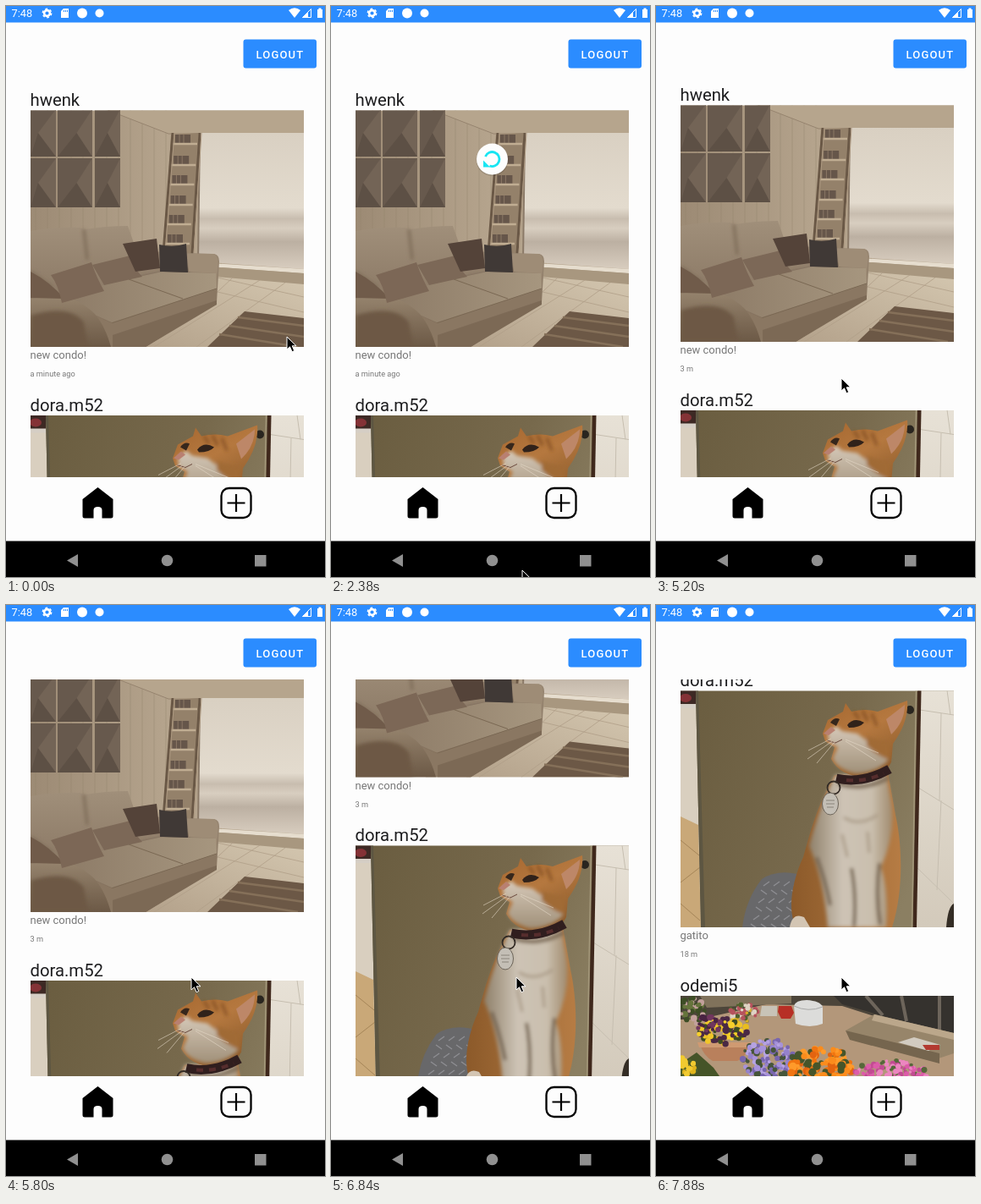
Animation, 377 px wide and 675 px high, one loop 8000 ms. Source, as an HTML page:

```html
<!DOCTYPE html>
<html lang="en">
<head>
<meta charset="utf-8">
<title>Photo feed</title>
<style>
html, body { margin: 0; width: 100%; height: 100%; overflow: hidden; background: #fdfdfd; }
svg { display: block; font-family: Roboto, sans-serif; }
.name { font-size: 20.3px; fill: #1d1d1f; }
.caption { font-size: 13px; fill: #777; }
.age { font-size: 9.2px; fill: #777; }
</style>
</head>
<body>
<svg width="377" height="675" viewBox="0 0 377 675">
<defs>
  <linearGradient id="wall"><stop stop-color="#9c8a74"/><stop offset=".5" stop-color="#b5a48d"/><stop offset="1" stop-color="#b3a38c"/></linearGradient>
  <linearGradient id="window" x2="0" y2="1">
    <stop stop-color="#d9d0c2"/><stop offset=".55" stop-color="#e3dbce"/><stop offset=".63" stop-color="#c8bdaf"/>
    <stop offset=".7" stop-color="#d8cec0"/><stop offset=".8" stop-color="#bcb0a2"/><stop offset="1" stop-color="#d8cdbf"/>
  </linearGradient>
  <linearGradient id="sofa" x2="0" y2="1"><stop stop-color="#a08f7a"/><stop offset="1" stop-color="#7d6a57"/></linearGradient>
  <linearGradient id="seat" x2="1"><stop stop-color="#8b7965"/><stop offset="1" stop-color="#a6967f"/></linearGradient>
  <linearGradient id="arm" x2="0" y2="1"><stop stop-color="#95836d"/><stop offset="1" stop-color="#6c5946"/></linearGradient>
  <linearGradient id="floor" x1="1" x2="0" y2="1"><stop stop-color="#d4c7b0"/><stop offset="1" stop-color="#b3a18a"/></linearGradient>
  <linearGradient id="door" x2="1" y2=".3"><stop stop-color="#695c3f"/><stop offset=".6" stop-color="#77694c"/><stop offset="1" stop-color="#8b7f62"/></linearGradient>
  <linearGradient id="fur" x2="1"><stop stop-color="#8c5a2a"/><stop offset="1" stop-color="#b67c44"/></linearGradient>
  <linearGradient id="chest" x2="1"><stop stop-color="#8f806a"/><stop offset=".4" stop-color="#cdc3b5"/><stop offset=".75" stop-color="#cabfae"/><stop offset="1" stop-color="#a08a6d"/></linearGradient>
  <linearGradient id="head" x2=".6" y2="1"><stop stop-color="#a5672f"/><stop offset=".5" stop-color="#b5783f"/><stop offset="1" stop-color="#8d5c2d"/></linearGradient>
  <linearGradient id="muzzle" x2="0" y2="1"><stop stop-color="#d6c9b9"/><stop offset="1" stop-color="#a09079"/></linearGradient>
  <linearGradient id="tiles" x2="0" y2="1"><stop stop-color="#e7e1d6"/><stop offset="1" stop-color="#d3cabb"/></linearGradient>
  <filter id="soft"><feGaussianBlur stdDeviation="2"/></filter>
</defs>
<rect width="377" height="675" fill="#fdfdfd"/>

<svg y="88" width="377" height="469" viewBox="0 88 377 469">
<g id="feed">
  <text class="name" x="28.5" y="118">hwenk</text>
  <svg x="29" y="123.5" width="323" height="279.5" viewBox="29 123.5 323 279.5">
    <rect x="29" y="123" width="323" height="280" fill="url(#wall)"/>
    <path id="planks" stroke="#94826c" stroke-width=".7" opacity=".6"/>
    <path d="M120 123H352V151H192z" fill="#b6a58d"/>
    <path d="M120 123L192 151H352" fill="none" stroke="#96846f"/>
    <path d="M229 150H352V311L227 302z" fill="url(#window)"/>
    <path d="M229 150L227 302" stroke="#8b7a68" stroke-width="2"/>
    <path d="M225 303L352 311V316L225 307z" fill="#e6ddce"/>
    <path d="M225 307L352 316V330L225 320z" fill="#a8977f"/>
    <path d="M225 318L352 329V403H160z" fill="url(#floor)"/>
    <path d="M245 320L352 344M250 338L352 362M330 327L225 403M300 324L175 403M268 321L235 352" stroke="#b09f88" stroke-width=".8"/>
    <path d="M282 361L352 369V403H238z" fill="#6c5846"/>
    <path d="M274 368L352 378M264 378L352 391M252 388L345 403" stroke="#857059" stroke-width="2.500"/>
    <g id="panels"></g>
    <path d="M195 152L228 150 221 293H187z" fill="#94816a"/>
    <g id="shelves"></g>
    <path d="M197 150L186 292M229 150L220 293" stroke="#6a5846" stroke-width="3"/>
    <path d="M199 150L188 292M231 150L222 293" stroke="#ac9880"/>
    <path d="M29 266Q60 261 87 262L94 264Q118 260 144 260L151 280L182 291L246 293Q252 294 252 302L249 350L165 403H29z" fill="url(#sofa)"/>
    <g filter="url(#soft)" fill="none">
      <path d="M92 264L96 300M29 314L55 333" stroke="#7c6a57" stroke-width="3"/>
      <path d="M52 352L116 340 163 322 216 312" stroke="#69574a" stroke-width="5"/>
    </g>
    <path d="M55 350L124 327L185 314L249 316V334L125 374L98 362z" fill="url(#seat)"/>
    <path d="M59 350L125 375L249 334M145 323L209 346M213 296V314" stroke="#7a6853" fill="none"/>
    <path d="M100 364L126 375L249 335V349L165 403H112z" fill="#8a7762"/>
    <path d="M126 389L249 348V353L165 403H126z" fill="#7c6955"/>
    <path d="M29 346Q75 339 94 355Q114 367 124 403H29z" fill="url(#arm)"/>
    <path d="M29 366Q75 352 92 374L97 403H29z" fill="#6d5945" filter="url(#soft)"/>
    <path d="M214 293H246Q252 296 250 310L248 335V316L216 314z" fill="#9e8c76"/>
    <path d="M29 314Q52 326 69 346L29 345z" fill="#705b4a"/>
    <path d="M53 318L101 303Q107 321 116 337L66 351Q62 330 53 318z" fill="#7c6756"/>
    <path d="M102 306L147 295Q151 310 161 320L116 330z" fill="#7c6857"/>
    <path d="M138 281L178 275 182 310 153 314z" fill="#544339"/>
    <path d="M181 282Q198 286 213 281L215 315 182 314z" fill="#403936"/>
  </svg>
  <text class="caption" x="28.5" y="417">new condo!</text>
  <text class="age" id="age" x="28.5" y="438.300"></text>

  <text class="name" x="28.5" y="478.5">dora.m52</text>
  <svg x="29" y="484" width="323" height="279.5" viewBox="29 188.5 323 279.5">
    <rect x="29" y="188" width="323" height="280" fill="url(#door)"/>
    <path d="M29 188H47L53 468H29z" fill="#d9cfbf"/>
    <path d="M29 188H47V208H29z" fill="#3d2924"/>
    <path d="M29 204H47V209H29z" fill="#d5cec5"/>
    <ellipse cx="35" cy="197" rx="7" ry="5" fill="#843236"/>
    <path d="M29 337L50 347 53 468H29z" fill="#c9a878"/>
    <path d="M29 365L51 383M29 415L52 397M29 440L52 460" stroke="#a58558"/>
    <path d="M47 188L53 468H58L50 188z" fill="#5d5642"/>
    <path d="M313 188H352V468H305z" fill="url(#tiles)"/>
    <path d="M312 211L352 217M310 303L352 329M308 397L352 440M344 188L348 217M337 215L335 318M337 318L332 424" stroke="#c6beb0" fill="none"/>
    <path d="M309 188H313.500L308 468H303.500z" fill="#3f281c"/>
    <path d="M307.500 188L302.500 468" stroke="#a3977a" stroke-width="1.500"/>
    <path d="M343 468Q345 443 352 440V468z" fill="#342d25"/>
    <circle cx="300" cy="211" r="5" fill="#29251f"/>
    <path d="M102 468Q106 435 125 411Q145 398 174 407L195 468z" fill="#68686a"/>
    <path id="tread" stroke="#8d8d91" stroke-width="1.500" fill="none"/>
    <path d="M211 288C188 330 183 354 174 385C160 415 155 450 166 468H279C293 425 291 370 283 335L274 285z" fill="url(#fur)"/>
    <g filter="url(#soft)">
      <path d="M212 288C199 313 188 345 181 372Q198 410 203 468H272Q275 425 266 397Q284 355 278 320L272 287z" fill="url(#chest)"/>
      <path d="M190 385Q200 411 206 442M231 398Q237 430 234 467M264 392Q259 430 265 465" stroke="#75644f" stroke-width="4" fill="none"/>
      <path d="M215 298Q245 308 275 291" stroke="#7d6b55" stroke-width="5" fill="none"/>
      <path d="M222 338Q240 350 262 335M220 358L226 385M250 355L252 380" stroke="#a99a86" stroke-width="3" fill="none"/>
    </g>
    <path d="M158 468Q161 450 175 456L182 468z" fill="#d3c5b3"/>
    <path d="M197 239L203 223L221 213 224 203L231 213Q248 209 262 213L297 200Q299 225 280 251L278 273Q270 289 247 290Q218 290 207 269L211 255 200 248z" fill="url(#head)"/>
    <path d="M272 222L294 205Q294 225 278 240z" fill="#bd8768"/>
    <g filter="url(#soft)">
      <path d="M203 238L213 230L220 236 238 239Q251 250 268 259L274 271Q260 285 236 286Q214 281 209 268L215 255 204 249z" fill="url(#muzzle)"/>
      <path d="M249 242Q263 248 277 248L276 270Q262 266 249 253z" fill="#a06b36"/>
      <path d="M234 213L240 222M244 212L250 224M255 215L261 230" stroke="#845024" stroke-width="3"/>
    </g>
    <path d="M226 229Q234 219 246 226Q241 232 228 232z" fill="#30221a"/>
    <path d="M206 226Q211 219 217 222L213 230z" fill="#36271c"/>
    <path d="M198 239L207 231 212 235 204 241z" fill="#b98071"/>
    <path d="M202 247L212 250 220 246" stroke="#6b493d" fill="none"/>
    <path d="M207 245L180 259M208 248L179 269M211 249L190 274M224 248L260 271M224 246L263 262" stroke="#e4d9c8" stroke-width=".6"/>
    <path d="M213 292Q244 299 276 281" fill="none" stroke="#301e1e" stroke-width="11"/>
    <path d="M225 294Q248 296 269 286" fill="none" stroke="#562d2d" stroke-width="4" stroke-dasharray="8 7"/>
    <circle cx="210" cy="303" r="7.500" fill="none" stroke="#332b25" stroke-width="1.800"/>
    <ellipse cx="206" cy="322" rx="9.500" ry="13" fill="#c4bfb6" stroke="#6c6459"/>
    <path d="M201 318h10M201 322h10M202 326h8" stroke="#8a847a"/>
  </svg>
  <text class="caption" x="28.5" y="777.500">gatito</text>
  <text class="age" x="28.5" y="798.800">18 m</text>

  <text class="name" x="28.5" y="839">odemi5</text>
  <svg id="garden" x="29" y="844.5" width="323" height="279.5" viewBox="29 462 323 279.5">
    <rect x="29" y="462" width="323" height="280" fill="#b3977a"/>
    <path d="M29 462H352V516L220 474 130 472 50 490H29z" fill="#4c453a"/>
    <path d="M210 462H352V510L220 472z" fill="#35322e"/>
    <path d="M248 462L268 485M290 462L296 492M335 462V504" stroke="#6d655b" stroke-width="4"/>
    <path d="M52 462H160V471L60 476z" fill="#80725b"/>
    <path d="M224 503L258 484 352 506V530L334 536z" fill="#97856a"/>
    <path d="M224 503L335 530V542L229 514z" fill="#75654e"/>
    <path d="M258 484L352 506V514L255 491z" fill="#bba78b"/>
    <path d="M286 517L305 511 336 520 322 527z" fill="#d2cbc0"/>
    <path d="M315 520h20v6h-16z" fill="#b33a31"/>
    <path d="M163 474Q165 467 178 467Q194 468 197 475V495Q182 501 165 495z" fill="#dcdcda"/>
    <path d="M163 474Q180 482 197 475" fill="none" stroke="#a8a9a8"/>
    <path d="M125 474h18v12h-20z" fill="#c8c3b7"/>
    <path d="M145 474h15l3 8-4 7h-11l-4-8z" fill="#b72f25"/>
    <path d="M52 519H109Q107 535 96 539H67Q56 533 52 519z" fill="#b9805c"/>
    <path d="M49 517H112V523H51z" fill="#cf9a72"/>
    <path d="M29 542L48 529 68 547 75 557H29z" fill="#455428"/>
    <g id="flowers"></g>
  </svg>
</g>
<g id="spinner">
  <circle cy="1" r="19" opacity=".12"/>
  <circle r="18.500" fill="#fdfdfd"/>
  <g id="arc" fill="none" stroke="#18e5f2" stroke-width="2.800">
    <path d="M-8 -3A8.500 8.500 0 1 1 -3 8"/>
    <path id="arrow" d="M-10.500 1.500L-2.500 9.500H-10.500z" fill="#18e5f2" stroke="none"/>
  </g>
</g>
</svg>

<rect width="377" height="19.500" fill="#2b8cff"/>
<g fill="#fff">
  <text x="6.500" y="13" font-size="12.800">7:48</text>
  <circle cx="48.500" cy="8.500" r="3.400" fill="none" stroke="#fff" stroke-width="2.600"/>
  <circle cx="48.500" cy="8.500" r="5.200" fill="none" stroke="#fff" stroke-width="1.500" stroke-dasharray="2.700 2.745"/>
  <path d="M68 3H74V14H65V6z"/>
  <path d="M68.500 5v2M70.500 5v2M72.500 5v2" stroke="#2b8cff"/>
  <circle cx="90" cy="8.500" r="6"/>
  <circle cx="110.500" cy="8.500" r="5"/>
  <path d="M334 5Q341 -.5 348 5L341 14z"/>
  <path d="M360.500 3.500V13.500H350.500z" fill="none" stroke="#fff"/>
  <path d="M357 7V14H350z"/>
  <path d="M368 4h1.500V2.500h3V4H374V14H368z"/>
</g>
<rect x="280.500" y="39.500" width="86.500" height="34" rx="3" fill="#2b8cff"/>
<text x="295.500" y="61.500" font-size="13" font-weight="500" letter-spacing="1.150" fill="#fff">LOGOUT</text>

<path d="M108.500 569L126.500 583V603Q126.500 605.500 124 605.500H113.500V596Q113.500 592 108.500 592T103.500 596V605.500H93Q90.500 605.500 90.500 603V583z"/>
<rect x="254.500" y="570" width="35" height="35" rx="9" fill="none" stroke="#000" stroke-width="2.300"/>
<path d="M261.500 587.500H282.500M272 577V598" stroke="#000" stroke-width="2.200"/>

<rect y="632.500" width="377" height="42.500"/>
<g fill="#909090">
  <path d="M72 655.500L85 648V663z"/>
  <circle cx="190.500" cy="655.500" r="6.800"/>
  <rect x="294" y="649" width="13.500" height="13.500"/>
</g>
<path id="cursor" d="M0 0V15L3.500 11.800 6.100 17.700 8.700 16.500 6.200 10.800H11z" stroke="#fff" stroke-width="1"/>
</svg>

<script>
const $ = id => document.getElementById(id);
const range = n => [...Array(n).keys()];

// Repeated details inside the pictures
$('planks').setAttribute('d', range(12).map(i => `M${35 + i * 14} 123V300`).join(''));
$('tread').setAttribute('d', range(30).map(i => {
  const row = Math.floor(i / 5), x = 127 - row * 3 + i % 5 * 12, y = 414 + row * 10;
  return row % 2 ? `M${x} ${y}l7 5` : `M${x} ${y + 5}l7-5`;
}).join(''));

const columns = [[29, 59], [61, 102], [105, 135]], rows = [[122, 178], [180, 238]];
$('panels').innerHTML = rows.flatMap(([top, bottom]) => columns.map(([left, right], i) => {
  const x = left + (right - left) * [.3, .55, .5][i], y = (top + bottom) / 2;
  return `<path d="M${left} ${top}H${right}V${bottom}H${left}z" fill="#67594d"/>
    <path d="M${left} ${bottom}L${x} ${y} ${right} ${bottom}z" fill="#5d5045"/>
    <path d="M${right} ${top}L${x} ${y} ${right} ${bottom}z" fill="#736456"/>`;
})).join('');

$('shelves').innerHTML = [163, 188, 211, 235, 258, 281].map((y, i) => {
  const x = 196 - i * 1.8;
  return `<path d="M${x + 4} ${y - 11}h18v10h-18z" fill="#66564a"/>
    <path d="M${x + 9} ${y - 11}v10m5-10v10" stroke="#8b7865"/>
    <path d="M${x} ${y}h30" stroke="#c0ad92" stroke-width="2.500"/>`;
}).join('');

let seed = 7;
const random = () => (seed = seed * 16807 % 2147483647) / 2147483647;
const bed = (x, y, rx, ry, count, size, colors) => range(count).map(() => {
  const angle = random() * 2 * Math.PI, r = Math.sqrt(random());
  return `<circle cx="${x + rx * r * Math.cos(angle)}" cy="${y + ry * r * Math.sin(angle)}"
    r="${size * (.6 + random() * .7)}" fill="${colors[Math.floor(random() * colors.length)]}"/>`;
}).join('');
$('flowers').innerHTML =
  bed(42, 480, 16, 16, 45, 3, ['#3d4d25', '#66743c', '#c2a09b']) +
  bed(103, 483, 19, 11, 50, 2.6, ['#50612e', '#d8ad27', '#b6525d', '#dfd3c4']) +
  bed(80, 504, 30, 15, 100, 3, ['#3e4d22', '#e8bd1e', '#f6d02b', '#4a2944', '#f0c52a']) +
  bed(62, 495, 17, 10, 26, 3, ['#492342', '#71365e']) +
  bed(35, 547, 12, 12, 35, 3, ['#e1b51c', '#50612a', '#f1ca30']) +
  bed(133, 537, 31, 24, 150, 3, ['#9582cc', '#b6a3e2', '#7966ae', '#a792da', '#46553a']) +
  bed(197, 548, 38, 25, 130, 4, ['#f07410', '#fb8c1c', '#e36410', '#ff9a2a', '#46552a']) +
  bed(277, 556, 44, 18, 150, 2.7, ['#dc5ca9', '#ec86c0', '#c24b92', '#56683a']);

// Keys are [step, ...values]
const cursorKeys = [[0, 332, 391], [1, 332, 391], [2, 326, 389], [3, 321, 388], [5, 321, 388],
  [7, 300, 325], [10, 238, 125], [11, 228, 95], [13, 228, 95], [14, 229, 220], [15, 228, 450],
  [16, 226, 667], [18, 228, 672], [20, 239, 662], [21, 241, 654], [23, 241, 625],
  [27, 228, 490], [29, 222, 447], [30, 219, 440]];
const scrollKeys = [[0, 0], [34, 0], [35, 6], [36, 13], [37, 13], [38, 25], [39, 40], [40, 58],
  [41, 78], [42, 99], [46, 199.5], [49, 295.5], [53, 382.5]];
// step, centre y, scale, turn
const spinnerKeys = [[0, 65, 1, -180], [13, 65, 1, -180], [14, 95, 1, -130], [15, 145, 1, -60],
  [16, 181, 1, 0], [17, 160, 1, 60], [18, 129, 1, 150], [19, 129, 1, 260], [20, 129, .6, 350], [21, 129, 0, 360]];

function valuesAt(keys, step) {
  const i = keys.findLastIndex(key => key[0] <= step);
  const a = keys[i], b = keys[i + 1] || a;
  const f = a === b ? 0 : (step - a[0]) / (b[0] - a[0]);
  return a.map((v, j) => v + (b[j] - v) * f).slice(1);
}
const transform = (id, value) => $(id).setAttribute('transform', value);
const show = (id, visible) => $(id).style.opacity = visible ? 1 : 0;

function draw() {
  const step = Math.floor((performance.now() % 8000 + 5) / 148.7);
  const [scroll] = valuesAt(scrollKeys, step);
  const [y, scale, turn] = valuesAt(spinnerKeys, step);
  transform('cursor', `translate(${valuesAt(cursorKeys, step)})`);
  transform('feed', `translate(0 ${-scroll})`);
  transform('spinner', `translate(190.500 ${y}) scale(${scale})`);
  transform('arc', `rotate(${turn})`);
  show('arrow', step < 18);
  show('garden', step > 49); // the last picture loads late
  $('age').textContent = step < 20 ? 'a minute ago' : '3 m';
  requestAnimationFrame(draw);
}
draw();
</script>
</body>
</html>
```
